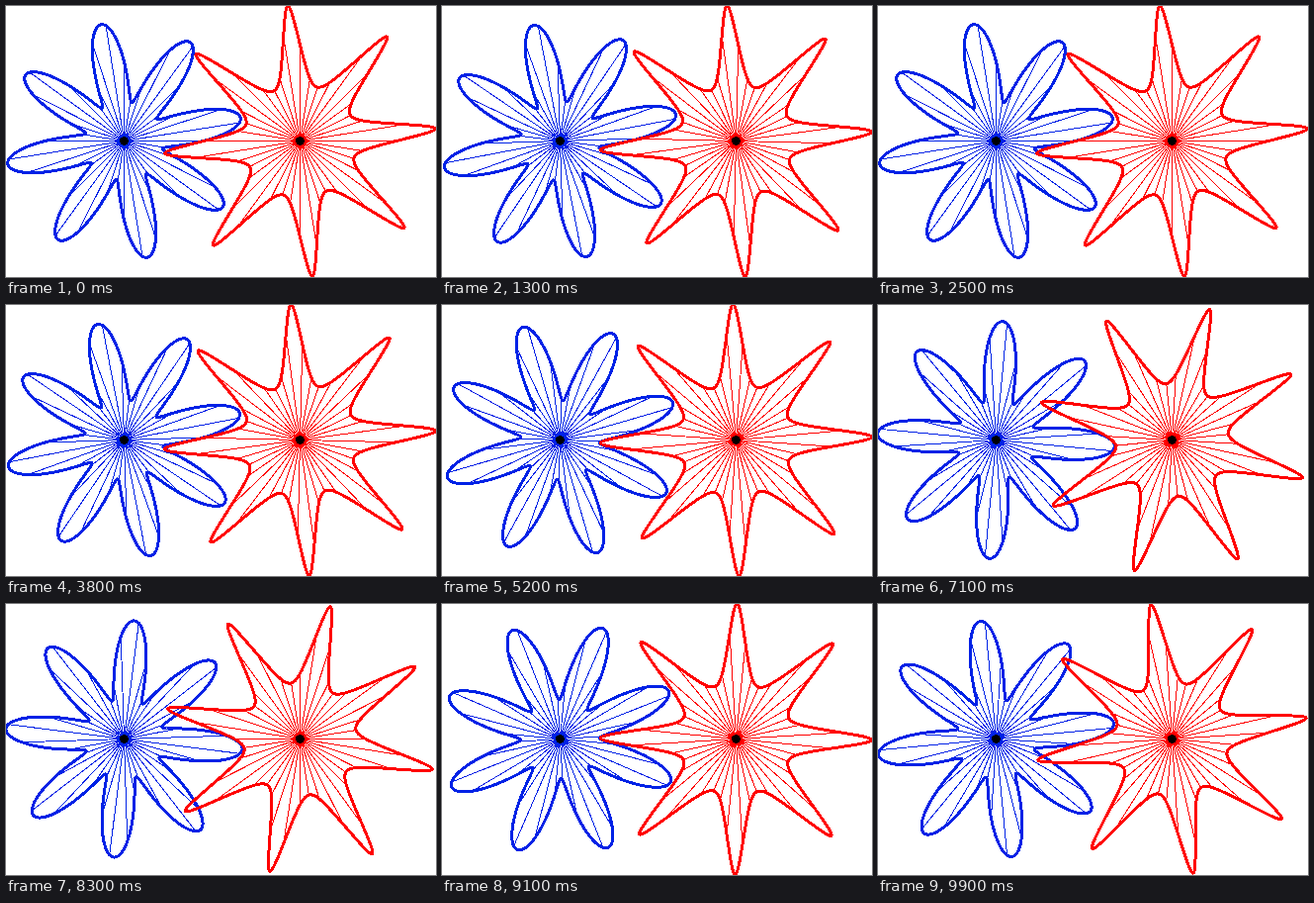
Recreate the animation shown at these times as an HTML page. Size 435 by 274 pixels, loop 10 s.

```html
<!DOCTYPE html>
<html lang="en">
<head>
<meta charset="utf-8">
<title>Rolling rosettes</title>
<style>
html, body { margin: 0; width: 100%; height: 100%; overflow: hidden; background: #fff; }
svg { display: block; shape-rendering: crispEdges; }
path { fill: none; stroke-linejoin: round; }
.rim { stroke-width: 3; }
.spokes { stroke-width: 1; }
#blue { stroke: #0022e6; }
#red { stroke: #f00; }
</style>
</head>
<body>
<svg width="435" height="274" viewBox="0 0 435 274">
  <g id="blue"><path class="spokes"/><path class="rim"/></g>
  <g id="red"><path class="spokes"/><path class="rim"/></g>
  <circle cx="119.5" cy="136.5" r="4.5"/>
  <circle cx="297.5" cy="136.5" r="4.5"/>
</svg>
<script>
const LOBES = 8, SPOKES = 40, STEPS = 960;
const FRAMES = 100, FRAME_MS = 100;
const TAU = 2 * Math.PI, START = TAU / 4;
const CENTER_Y = 136.5;

// Driver radius is MEAN + SWING cos(phase); GAP makes the follower close up with as many lobes.
const SWING = 40, MEAN = 80;
const GAP = (2 * MEAN + Math.sqrt(MEAN * MEAN + 3 * SWING * SWING)) / 1.5;
const REST = GAP - MEAN;
const K = Math.sqrt((REST + SWING) / (REST - SWING));

// Phase over which the follower turns while the driver turns by `phase`
function warp(phase, k) {
  const s = Math.sin(phase / 2), c = Math.cos(phase / 2);
  return 2 * Math.atan2((k - 1) * s * c, c * c + k * s * s);
}
const rolled = phase => phase + 2 * warp(phase, K);

// Follower radius as a function of its own phase, by inverting rolled()
function followerRadius(turned) {
  let low = turned - Math.PI, high = turned + Math.PI;
  for (let i = 0; i < 40; i++) {
    const mid = (low + high) / 2;
    if (rolled(mid) < turned) low = mid; else high = mid;
  }
  return REST - SWING * Math.cos(low);
}

const driver = p => [MEAN + SWING * Math.cos(p), p / LOBES];
const follower = p => [REST - SWING * Math.cos(p), Math.PI - rolled(p) / LOBES];
const followerSpoke = p => [followerRadius(p), Math.PI - p / LOBES];

// Points all the way round a curve, as [radius, angle]
const around = (count, start, curve) => Array.from({ length: count },
  (_, i) => curve(start + LOBES * TAU * i / count));

function wheel(id, x, rim, spokes) {
  const group = document.getElementById(id);
  const [spokePath, rimPath] = group.children;
  return angle => {
    const place = ([r, a]) => (x + r * Math.cos(a + angle)).toFixed(2) + ' ' +
      (CENTER_Y + r * Math.sin(a + angle)).toFixed(2);
    spokePath.setAttribute('d', spokes.map(p => `M${x} ${CENTER_Y}L${place(p)}`).join(''));
    rimPath.setAttribute('d', 'M' + rim.map(place).join('L') + 'Z');
  };
}

const turnBlue = wheel('blue', 119.5,
  around(STEPS, 0, driver), around(SPOKES, START, driver));
const turnRed = wheel('red', 297.5,
  around(STEPS, 0, follower), around(SPOKES, rolled(START), followerSpoke));

let shown = -1;
function draw(time) {
  const frame = Math.floor(time / FRAME_MS) % FRAMES;
  if (frame === shown) return;
  shown = frame;
  const phase = START + LOBES * TAU * frame / FRAMES;
  turnBlue(-phase / LOBES);
  turnRed(rolled(phase) / LOBES);
}

const begin = performance.now();
function tick() {
  draw(performance.now() - begin);
  requestAnimationFrame(tick);
}
tick();
</script>
</body>
</html>
```
